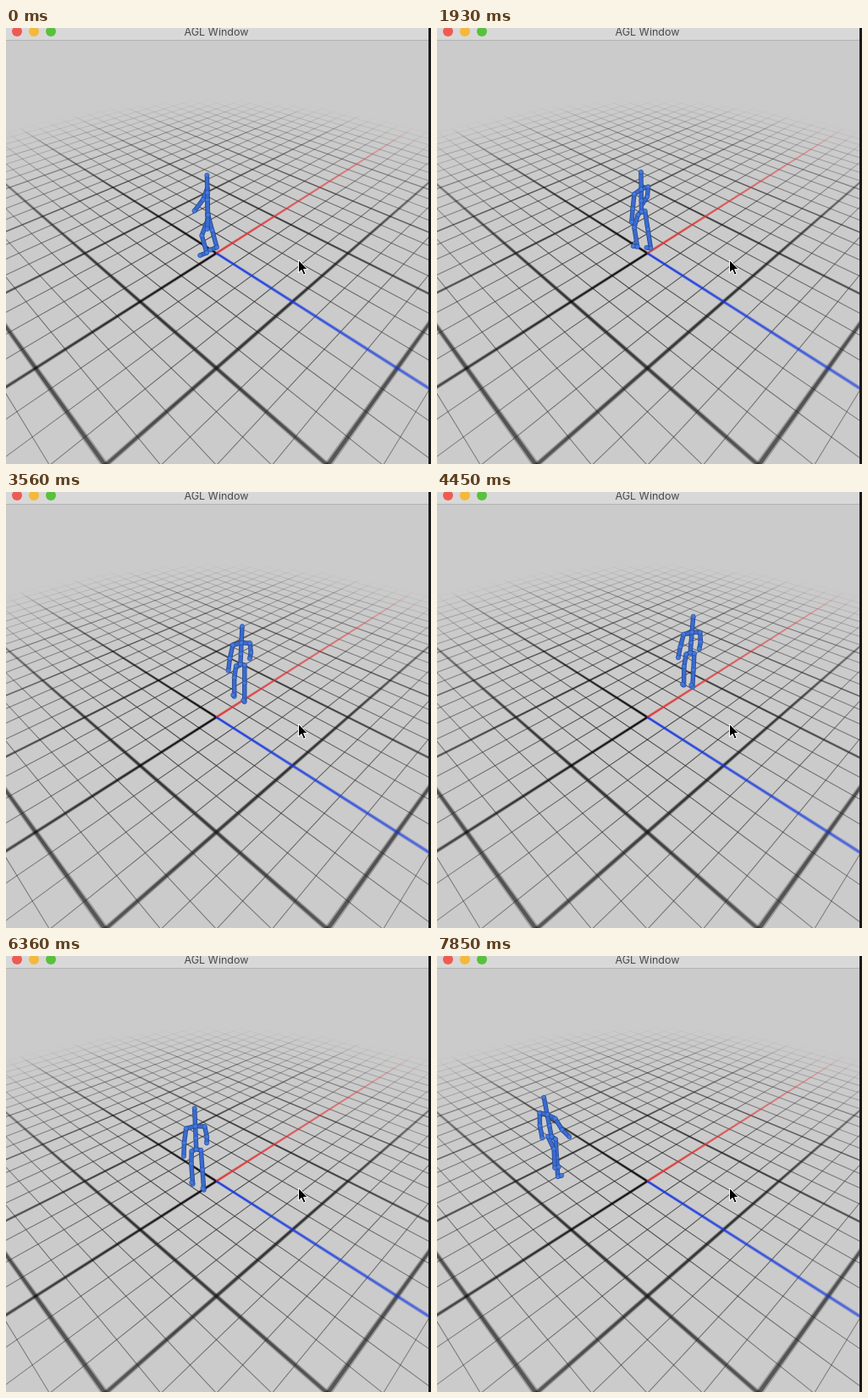
Write an HTML page with a canvas that moves like this. It is 502x514 px and loops after 8000 ms.

```html
<!DOCTYPE html>
<html lang="en">
<head>
<meta charset="utf-8">
<title>AGL Window</title>
<style>
html, body { margin: 0; width: 100%; height: 100%; overflow: hidden; background: #cbcbcb; }
canvas { position: absolute; left: 0; top: 0; width: 502px; height: 514px; }
#bar { position: absolute; left: 0; top: 0; width: 499px; height: 15px; box-sizing: border-box;
  overflow: hidden; background: #d8d8d8; border-bottom: 1px solid #b2b2b2; }
#bar span { position: absolute; left: 0; width: 497px; top: -5px; text-align: center;
  font: 12.5px/20px Inter, sans-serif; color: #4b4b4b; }
#bar i { position: absolute; top: -2px; width: 12px; height: 12px; border-radius: 50%; }
#edge { position: absolute; left: 499px; top: 0; width: 3px; height: 514px; background: #1b1b1b; }
svg { position: absolute; left: 344px; top: 272px; }
</style>
</head>
<body>
<canvas id="floor" width="502" height="514"></canvas>
<canvas id="walker" width="502" height="514"></canvas>
<div id="bar">
  <i style="left:7px;background:#ee5b52"></i>
  <i style="left:27px;background:#f5b83a"></i>
  <i style="left:47px;background:#58c13e"></i>
  <span>AGL Window</span>
</div>
<div id="edge"></div>
<svg width="14" height="22"><path d="M1.5 1.5V16.5L5 13.3L7.4 19L10 18L7.6 12.4H12.2Z" fill="#000" stroke="#fff"/></svg>
<script>
const LOOP = 8000, FRAMES = 54, EXTENT = 5, CELLS = 4, FADE = 5.1, NEAR = 3.7;
const CENTER = 248.5, HORIZON = -96.8, GROUND = 362.3, VANISH_DOWN = 796;
const floor = document.getElementById('floor').getContext('2d');
const stage = document.getElementById('walker').getContext('2d');

// Ground plane: u runs along the red axis, v along the blue one.
function project(u, v) {
  const z = 1 / (1 - 0.1361 * (v - u));
  return [CENTER + 77.7 * (u + v) * z, HORIZON + GROUND * z];
}

function fadeAlong(a, b, rgb, strength) {
  const p = project(...a), q = project(...b);
  const paint = floor.createLinearGradient(...p, ...q);
  const axis = Math.abs(q[0] - p[0]) > Math.abs(q[1] - p[1]) ? 0 : 1;
  for (let i = 0; i <= 24; i++) {
    const u = a[0] + (b[0] - a[0]) * i / 24, v = a[1] + (b[1] - a[1]) * i / 24;
    const at = (project(u, v)[axis] - p[axis]) / (q[axis] - p[axis]);
    const alpha = strength * Math.max(0, 1 - Math.hypot(u, v) / FADE);
    paint.addColorStop(Math.min(1, Math.max(0, at)), `rgba(${rgb},${alpha})`);
  }
  return paint;
}

function thinLine(a, b) {
  floor.strokeStyle = fadeAlong(a, b, '30,30,30', 0.8);
  floor.lineWidth = 1.1;
  floor.beginPath();
  floor.moveTo(...project(...a));
  floor.lineTo(...project(...b));
  floor.stroke();
}

function ribbon(a, b, rgb, width, strength) {
  const du = a[0] === b[0] ? width / 2 : 0, dv = width / 2 - du;
  floor.fillStyle = fadeAlong(a, b, rgb, strength);
  floor.beginPath();
  floor.moveTo(...project(a[0] - du, a[1] - dv));
  floor.lineTo(...project(b[0] - du, b[1] - dv));
  floor.lineTo(...project(b[0] + du, b[1] + dv));
  floor.lineTo(...project(a[0] + du, a[1] + dv));
  floor.fill();
}

function softLine(a, b, rgb) {
  ribbon(a, b, rgb, 0.039, 0.45);
  ribbon(a, b, rgb, 0.022, 0.9);
}

function drawFloor() {
  const spanU = c => [[c, -EXTENT], [c, Math.min(EXTENT, c + NEAR)]];
  const spanV = c => [[Math.max(-EXTENT, c - NEAR), c], [EXTENT, c]];
  const lines = EXTENT * CELLS;
  for (let i = -lines; i <= lines; i++) {
    const c = i / CELLS;
    if (i === 0) continue;
    const draw = i % CELLS ? thinLine : (a, b) => softLine(a, b, '20,20,20');
    if (c + NEAR > -EXTENT) draw(...spanU(c));
    if (c - NEAR < EXTENT) draw(...spanV(c));
  }
  softLine([0, -EXTENT], [0, 0], '0,0,0');
  softLine([-NEAR, 0], [0, 0], '0,0,0');
  softLine([0, 0], [EXTENT, 0], '222,48,48');
  softLine([0, 0], [0, NEAR], '16,52,222');
}

// Places the walk passes: step, ground x, ground y, heading (0 = away), gait cycles
const ROUTE = [
  [0, 239, 262, -90, 0],
  [9, 183, 264, -90, 1.4],
  [13, 242, 257, -40, 2],
  [24, 275, 242, -10, 4],
  [32, 303, 222, -10, 5.3],
  [36, 283.5, 236, -10, 6],
  [43, 226.5, 270, -10, 7],
  [47, 190, 286, 5, 7.8],
  [53, 143, 253, 30, 9]
];

function routeAt(step) {
  const next = Math.max(1, ROUTE.findIndex(row => row[0] >= step));
  const a = ROUTE[next - 1], b = ROUTE[next];
  const f = (step - a[0]) / (b[0] - a[0]);
  return a.map((value, i) => value + (b[i] - value) * f);
}

// Body space is [right, forward, up]; a limb swings in the forward plane.
const swingFrom = ([r, f, h], length, angle, out = 0) =>
  [r + out, f + length * Math.sin(angle), h - length * Math.cos(angle)];

function legChain(side, phase, hipHeight) {
  const thigh = 0.05 + 0.5 * Math.sin(phase + 0.5);
  const shin = thigh - 0.25 - 0.25 * Math.cos(phase + 0.2);
  const hip = [side * 5.5, 0, hipHeight];
  const knee = swingFrom(hip, 26, thigh);
  const ankle = swingFrom(knee, 27, shin);
  return [hip, knee, ankle, swingFrom(ankle, 9, shin + 1.3)];
}

function armChain(side, phase, neckHeight) {
  const upper = 0.12 + 0.3 * Math.sin(phase + 0.5);
  const shoulder = [side * 11, 0, neckHeight - 2];
  const elbow = swingFrom(shoulder, 21, upper, side * 3);
  return [shoulder, elbow, swingFrom(elbow, 21, upper * 1.6 + 0.1, side)];
}

function bodyChains(phase) {
  const other = phase + Math.PI;
  const drop = Math.min(legChain(-1, phase, 0)[2][2], legChain(1, other, 0)[2][2]);
  const hipHeight = -drop, neckHeight = hipHeight + 37;
  const neck = [0, 0, neckHeight], pelvis = [0, 0, hipHeight + 2];
  return [
    [pelvis, ...legChain(1, other, hipHeight)],
    [neck, ...armChain(1, phase, neckHeight)],
    [pelvis, ...legChain(-1, phase, hipHeight)],
    [pelvis, [0, 0, hipHeight + 19], neck, [0, 0, neckHeight + 27]],
    [neck, ...armChain(-1, other, neckHeight)]
  ];
}

function toScreen([right, forward, up], x, y, heading) {
  const scale = (y - HORIZON) / GROUND;
  const across = right * Math.cos(heading) + forward * Math.sin(heading);
  const toward = right * Math.sin(heading) - forward * Math.cos(heading);
  const rise = up * 0.77 * scale;
  const lean = (CENTER - x) / (VANISH_DOWN - y);
  return [x + across * scale - rise * lean, y - rise + toward * 0.63 * scale];
}

function bone(p, q, color, width) {
  stage.strokeStyle = color;
  stage.lineWidth = width;
  stage.beginPath();
  stage.moveTo(...p);
  stage.lineTo(...q);
  stage.stroke();
}

function knob([x, y]) {
  stage.fillStyle = '#437ae0';
  stage.strokeStyle = '#2b50a0';
  stage.lineWidth = 0.7;
  stage.beginPath();
  stage.arc(x, y, 2.6, 0, 7);
  stage.fill();
  stage.stroke();
}

function drawWalker(step) {
  const [, x, y, degrees, cycles] = routeAt(step);
  stage.clearRect(0, 0, 502, 514);
  for (const chain of bodyChains(cycles * 2 * Math.PI)) {
    const points = chain.map(joint => toScreen(joint, x, y, degrees * Math.PI / 180));
    for (let i = 1; i < points.length; i++) {
      bone(points[i - 1], points[i], '#25478f', 5.4);
      bone(points[i - 1], points[i], '#3b6bcd', 3.8);
    }
    points.forEach(knob);
  }
}

function tick() {
  const time = performance.now() % LOOP;
  drawWalker(Math.min(FRAMES - 1, Math.floor((time + 12) * FRAMES / LOOP)));
  requestAnimationFrame(tick);
}

drawFloor();
tick();
</script>
</body>
</html>
```
